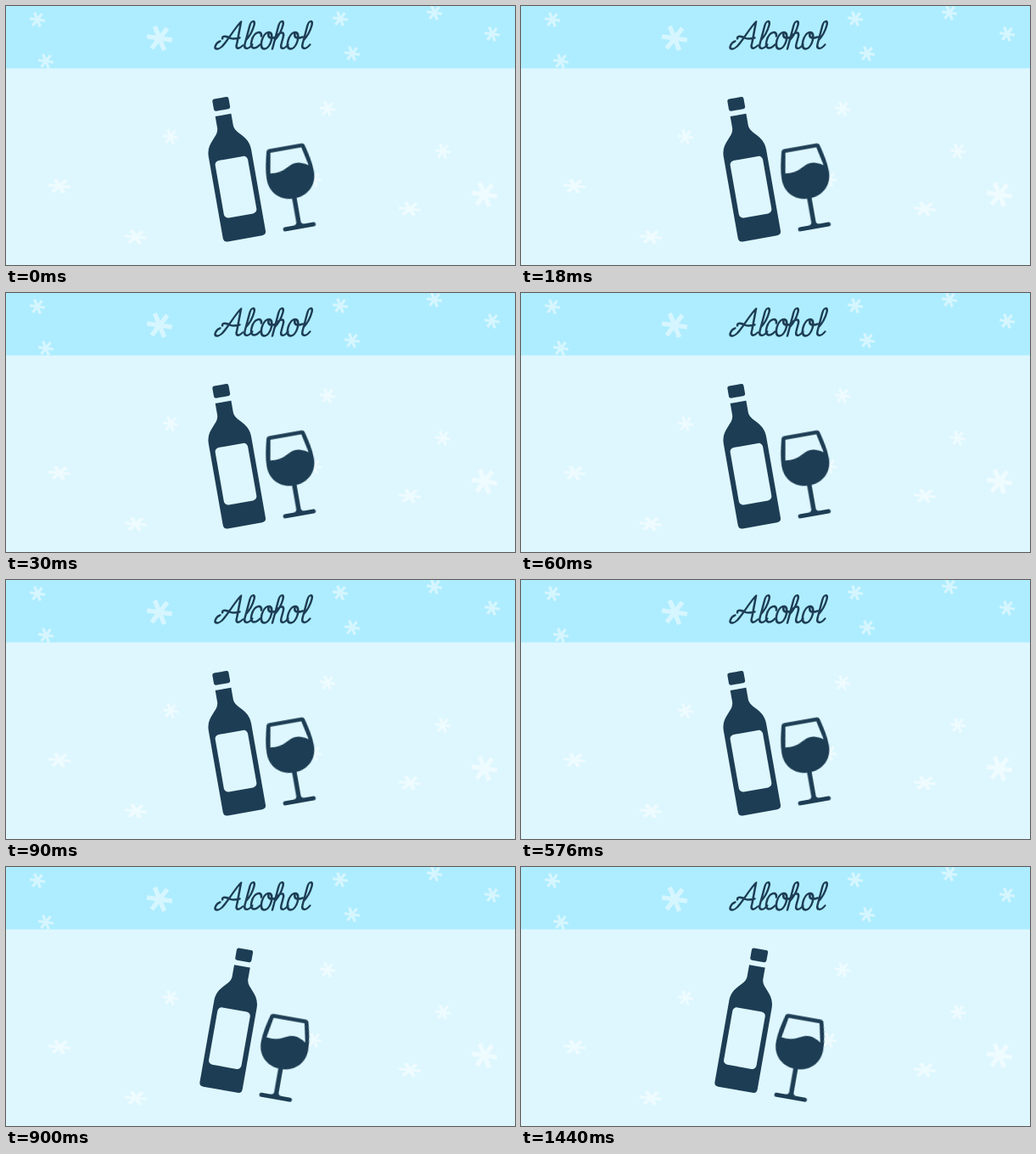
Animation of 600x305 px, one loop 1.8 s. Source, as an HTML page:

```html
<!DOCTYPE html>
<html lang="en">
<head>
<meta charset="utf-8">
<title>Alcohol</title>
<style>
  html, body { margin: 0; width: 100%; height: 100%; overflow: hidden; background: #def7ff; }
  svg { display: block; width: 600px; height: 305px; }
  .ink { fill: #1d3d54; }
  .paper { fill: #def7ff; }
  #lettering { fill: none; stroke: #1d3d54; stroke-width: 2.5; stroke-linecap: round; stroke-linejoin: round; }
  #snow { stroke: #fff; stroke-width: .36; opacity: .5; }
  .selectable { font: 32px "Noto Serif", serif; fill: transparent; }
</style>
</head>
<body>
<svg viewBox="0 0 600 305">
  <rect class="paper" width="600" height="305"/>
  <rect width="600" height="73.5" fill="#aeedff"/>
  <g id="snow"></g>

  <!-- Script lettering, with selectable text beneath it -->
  <text class="selectable" x="302" y="50" text-anchor="middle">Alcohol</text>
  <g id="lettering" transform="translate(0 50.5) skewX(-15)"></g>

  <!-- Bottle and glass, upright -->
  <g id="drinks">
    <g transform="translate(-29.4)">
      <rect class="ink" x="-9.7" y="-84" width="19.4" height="14.300" rx="2.500"/>
      <path class="ink" d="M-9.500-63.600H9.500V-50C9.500-39 25.500-36 25.500-18V79Q25.500 84 20.500 84H-20.500Q-25.500 84-25.500 79V-18C-25.500-36-9.500-39-9.500-50Z"/>
      <rect class="paper" x="-19.500" y="-11.800" width="39" height="68.500" rx="5"/>
    </g>
    <g transform="translate(36.2)">
      <path class="ink" d="M-19-14.700H19Q22.300-14.700 23-11.500C25.500-1 28.200 9 28.200 20C28.200 36 17 46.500 2.700 47.600V76Q3 79 7 79H17A2.500 2.500 0 0 1 17 84H-17A2.500 2.500 0 0 1-17 79H-7Q-3 79-2.700 76V47.600C-17 46.500-28.200 36-28.200 20C-28.200 9-25.500-1-23-11.500Q-22.300-14.700-19-14.700Z"/>
      <path class="paper" d="M-18.500-10.200H18.500L23.300 12C17 7.500 10 5.500 4 7.500C-3 10-9 16-22.800 13.800Z"/>
    </g>
  </g>
</svg>
<script>
const LOOP = 1800, TILT = 10;
const byId = id => document.getElementById(id);

// Snow: one six-armed shape in three sizes
const flakeArms = [0, 60, 120].map(angle =>
  `<path d="M-1 0H1" transform="rotate(${angle + 8})"/>`).join("");

const snow = (rx, ry, centres) => centres.map(([x, y]) =>
  `<g transform="translate(${x} ${y}) scale(${rx} ${ry})">${flakeArms}</g>`).join("");

byId("snow").innerHTML =
  snow(9, 9, [[37, 16], [47, 65], [394, 15], [408, 56], [505, 8], [573, 33],
              [194, 154], [379, 121], [515, 171], [363, 204]]) +
  snow(15, 15, [[181, 38], [564, 222]]) +
  snow(13, 8.5, [[63, 212], [153, 272], [476, 239]]);

// Letters stand upright on y = 0; the group slants them
const loop = "M0-10C4-16 5-22 5-28C5-34 0-34 0-27";
const glyphs = {
  A: "M6-9C1-7 0 1 6 0C13-1 18-24 24.500-32L26.500-7C26 0 30 1 34-4M8-12C6-16 12-15 16-13S24-12 28-13",
  l: loop + "V-6C0 1 6 1 9-5",
  c: "M10-15C9-22 0-21 0-10C0 1 7 1 11-5",
  o: "M5.500-19.500C-2-19.500-2 0 5.500 0S13-19.500 5.500-19.500C5.500-12 11-12 16-14",
  h: loop + "V0V-12C2-20 9-22 9-14V-6C9 1 14 1 17-5"
};
const starts = [244, 280, 287, 299, 314, 330, 348];

byId("lettering").innerHTML = [..."Alcohol"].map((letter, i) =>
  `<path d="${glyphs[letter]}" transform="translate(${starts[i]})"/>`).join("");

// The drinks tip from one side to the other halfway through the loop
function draw(now) {
  const tilt = now % LOOP < LOOP / 2 ? -TILT : TILT;
  byId("drinks").setAttribute("transform", `translate(300 186) rotate(${tilt}) translate(-3.9 -.7)`);
  requestAnimationFrame(draw);
}
draw(performance.now());
</script>
</body>
</html>
```
